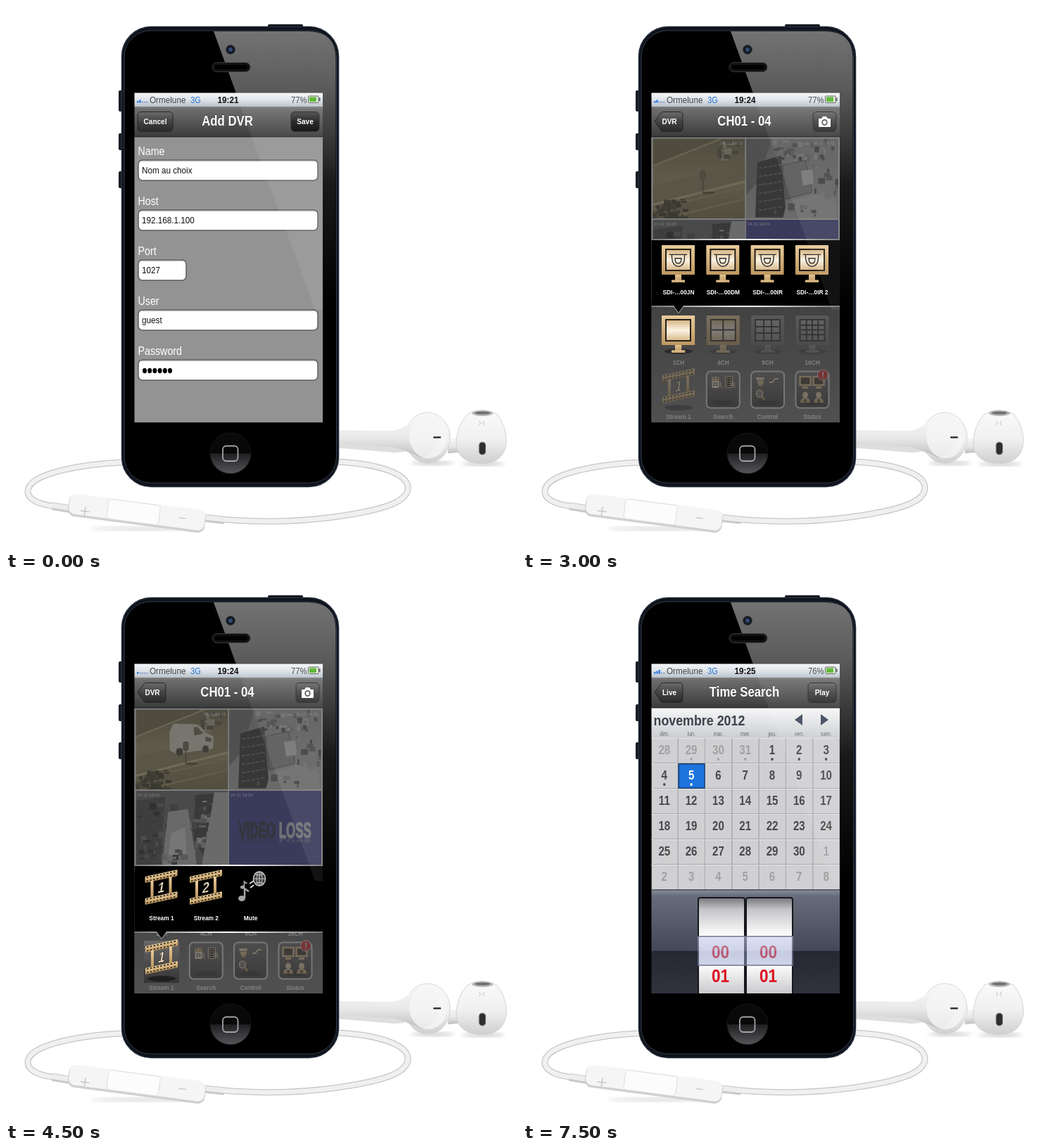
Recreate the animation shown at these times as an HTML page. Size 726x772 px, loop 8 s.

```html
<!DOCTYPE html>
<html lang="fr">
<head>
<meta charset="utf-8">
<title>DVR app tour</title>
<style>
html, body { margin: 0; width: 100%; height: 100%; overflow: hidden; background: #fff; }
svg { display: block; font-family: "Liberation Sans", Arial, sans-serif; }
.scene { visibility: hidden; animation: show 8s step-end infinite; }
.scene.last { animation-name: showLast; }
@keyframes show { 0% { visibility: visible; } 18.75%, 100% { visibility: hidden; } }
@keyframes showLast { 0% { visibility: visible; } 6.25%, 100% { visibility: hidden; } }
</style>
</head>
<body>
<svg id="stage" width="100%" height="100%" viewBox="0 0 726 772"></svg>
<script>
const CARRIER = 'Ormelune';
const defs = [];

const gradient = (id, stops, horizontal = false) => {
  defs.push(`<linearGradient id="${id}" x1="0" y1="0" x2="${+horizontal}" y2="${+!horizontal}">` +
    stops.map(([at, color, alpha = 1]) => `<stop offset="${at}" stop-color="${color}" stop-opacity="${alpha}"/>`).join('') +
    '</linearGradient>');
  return `url(#${id})`;
};
const rect = (x, y, w, h, fill, r = 0, more = '') =>
  `<rect x="${x}" y="${y}" width="${w}" height="${h}" rx="${r}" fill="${fill}" ${more}/>`;
const oval = (x, y, rx, ry, fill, more = '') =>
  `<ellipse cx="${x}" cy="${y}" rx="${rx}" ry="${ry}" fill="${fill}" ${more}/>`;
const shape = (d, fill, more = '') => `<path d="${d}" fill="${fill}" ${more}/>`;
const line = (d, color, width, more = '') =>
  `<path d="${d}" fill="none" stroke="${color}" stroke-width="${width}" ${more}/>`;
const at = (x, y, scale, body) => `<g transform="translate(${x} ${y}) scale(${scale})">${body}</g>`;
const repeat = (n, draw) => Array.from({ length: n }, (_, i) => draw(i)).join('');

// The handset shows a 320 x 480 interface on a 268 x 469 screen.
const text = (x, y, label, size, fill = '#fff', { anchor = 'middle', weight = 700, more = '' } = {}) =>
  `<text transform="translate(${x} ${y}) scale(.8375 .977)" dy=".36em" font-size="${size}" font-weight="${weight}" ` +
  `text-anchor="${anchor}" fill="${fill}" ${more}>${label}</text>`;

const randomizer = seed => () => (seed = (seed * 16807) % 2147483647) / 2147483647;

const paint = {
  status: gradient('status', [[0, '#f6f8fa'], [.5, '#dfe4e9'], [1, '#b9c2cb']]),
  nav: gradient('nav', [[0, '#808080'], [.08, '#6d6d6d'], [1, '#3b3b3b']]),
  button: gradient('button', [[0, '#6c6c6c'], [.5, '#424242'], [1, '#2a2a2a']]),
  black: gradient('black', [[0, '#4a4a4a'], [.5, '#1b1b1b'], [1, '#050505']]),
  menu: gradient('menu', [[0, '#484646'], [.45, '#5b5959'], [1, '#747272']]),
  tan: gradient('tan', [[0, '#e8cb9b'], [1, '#bd975f']]),
  steel: gradient('steel', [[0, '#8a8a8a'], [1, '#626262']]),
  glass: gradient('glass', [[0, '#d9b785'], [.5, '#fbf3e4'], [1, '#d9bb8c']]),
  dull: gradient('dull', [[0, '#a9a9a9'], [1, '#7b7b7b']]),
  tile: gradient('tile', [[0, '#6a6868'], [.6, '#4a4848'], [1, '#353333']]),
  rule: gradient('rule', [[0, '#777'], [.5, '#fff'], [1, '#777']], true)
};

/* ---------- bars ---------- */
const statusBar = (clock, level, bars) =>
  rect(182, 123, 269, 20, paint.status) +
  repeat(5, i => {
    const h = i < bars ? 2.5 + i * 1.4 : 1.6;
    return rect(186 + i * 3.3, 137.5 - h, 2.5, h, i < bars ? '#2f7de0' : '#7f9cc4');
  }) +
  text(204, 133, CARRIER, 14, '#3f4347', { anchor: 'start', weight: 400 }) +
  text(269.5, 133, '3G', 13, '#2272d8', { weight: 400 }) +
  text(315.5, 133, clock, 14, '#111') +
  text(427.5, 133, level + '%', 13.5, '#3f4347', { anchor: 'end', weight: 400 }) +
  rect(429.5, 128, 14.5, 9.5, '#e8f4e0', 1, 'stroke="#555"') +
  rect(431, 129.5, 10, 6.5, '#55b52c') + rect(444.5, 130.5, 2, 4.5, '#555');

const button = (x, w, label, fill = paint.button) =>
  rect(x, 150.5, w, 28, fill, 5, 'stroke="#252525"') + text(x + w / 2, 164, label, 12);
const backButton = label =>
  shape('M187 164 L196 152 Q197 150.500 200 150.500 H222 Q227 150.500 227 155 V174 Q227 178.500 222 178.500 H200 Q197 178.500 196 177 Z',
    paint.button, 'stroke="#252525"') + text(208, 164, label, 12);
const cameraButton =
  rect(412, 150.500, 33, 28, paint.button, 5, 'stroke="#2a2a2a"') +
  shape('M420 160 h4 l2 -3 h5 l2 3 h4 v12 h-17 z', '#fff') +
  oval(428.500, 165.500, 4.200, 4.500, '#555') + oval(428.500, 165.500, 2.400, 2.700, '#fff');
const navBar = (title, controls) =>
  rect(182, 143, 269, 43, paint.nav) + rect(182, 185, 269, 1.5, '#2a2a2a') +
  text(314.5, 163, title, 20, '#fff', { more: 'style="text-shadow:0 -1px #333"' }) + controls;

/* ---------- form ---------- */
const field = (y, label, value, w = 255) =>
  text(187.5, y - 12.5, label, 17, '#fff', { anchor: 'start', weight: 400 }) +
  rect(188, y, w, 29, '#fff', 6, 'stroke="#5d5d5d" stroke-width="1.5"') +
  line(`M192 ${y + 1.5} h${w - 8}`, '#bbb', 1) +
  (value ? text(193, y + 14, value, 14, '#111', { anchor: 'start', weight: 400 })
    : repeat(6, i => oval(197 + i * 7.2, y + 15.5, 3, 3.7, '#000')));

const form = rect(182, 186, 269, 407, '#939393') +
  field(219, 'Name', 'Nom au choix') + field(290, 'Host', '192.168.1.100') +
  field(361, 'Port', '1027', 68) + field(432, 'User', 'guest') + field(503, 'Password');

/* ---------- cameras ---------- */
const stamp = x => `<text x="${x}" y="8" font-size="6" fill="#fff">24-11 19:23</text>`;
const view = (x, y, body) => `<svg x="${x}" y="${y}" width="131" height="113.500">${body}</svg>`;
const clutter = (seed, n, x, y, w, h, tone = v => `rgb(${v},${v},${v})`) => {
  const rnd = randomizer(seed);
  return repeat(n, () => {
    const [px, py, pw, ph] = [x + rnd() * w, y + rnd() * h, 2 + rnd() * 9, 2 + rnd() * 8];
    return rect(px.toFixed(1), py.toFixed(1), pw.toFixed(1), ph.toFixed(1), tone(Math.round(25 + rnd() * 190)));
  });
};
gradient('street', [[0, '#6c6541'], [.5, '#9d905f'], [1, '#766c42']]);
gradient('wall', [[0, '#8f8f8f'], [1, '#b0b0b0']]);

const van = (x, y) => at(x, y, 1,
  shape('M0 12 L4 2 Q5 0 9 0 L38 1 Q45 3 50 12 L62 18 V34 Q58 38 52 37 L10 43 L0 38 Z', '#e4dfc8') +
  shape('M34 5 H40 L48 14 L35 17 Z M51 18 l8 3 v5 l-8 -1 z', '#696347') +
  oval(14, 40, 5, 5.5, '#39351f') + oval(51, 36, 4.5, 5, '#39351f'));

const street = vanAt => view(184.5, 188.5,
  rect(0, 0, 131, 114, 'url(#street)') + shape('M0 0 H92 L0 37 Z', '#6d653d') +
  line('M0 39 L98 0', '#b9ab76', 2) + shape('M0 68 L131 34 V58 L0 91 Z', '#8b7f54') +
  line('M0 94 L131 61', '#cdbd83', 3) + line('M0 101 L131 69 M30 110 L131 86', '#a5975f', 2) +
  clutter(19, 14, 92, 4, 30, 20, v => v > 120 ? '#b4ad8a' : '#514d35') +
  (vanAt ? van(...vanAt) : '') +
  line('M71 58 V76', '#4b4529', 1.5) + rect(67.5, 46, 7, 12, '#6d6546', 2, 'stroke="#4b4529"') +
  oval(79, 77, 9, 1.8, '#4f482b') +
  clutter(7, 42, -3, 82, 47, 32, v => v > 110 ? '#403b20' : '#2c2916') + stamp(96));

const office = view(317, 188.5,
  rect(0, 0, 131, 114, 'url(#wall)') + shape('M0 0 H36 L18 60 L0 80 Z', '#717171') +
  shape('M16 34 L50 24 L57 112 H13 Z', '#292929') +
  repeat(6, i => line(`M18 ${42 + i * 12} l33 -5`, '#777', 1.5, 'stroke-dasharray="5 2"')) +
  clutter(31, 38, 38, 0, 88, 28) + shape('M52 38 L84 31 L94 76 L57 86 Z', '#888', 'stroke="#3d3d3d"') +
  shape('M78 46 L94 44 L96 64 L81 67 Z', '#ddd') + clutter(43, 20, 94, 26, 34, 68) +
  shape('M58 90 L100 78 L128 92 V114 H52 Z', '#bcbcbc') + clutter(12, 10, 40, 90, 60, 20) + stamp(94));

const shop = view(184.5, 304,
  rect(0, 0, 131, 114, '#5f5f5f') + shape('M0 14 L42 8 L34 114 H0 Z', '#3c3c3c') +
  clutter(55, 50, 2, 14, 48, 88, v => `rgb(${v >> 1},${v >> 1},${v >> 1})`) +
  shape('M46 30 L74 26 L88 114 H36 Z', '#b8b8b8') + shape('M50 60 L70 52 L72 90 L46 92 Z', '#e0e0e0') +
  shape('M84 6 L110 4 L100 100 L82 68 Z', '#2d2d2d') + clutter(81, 34, 78, 6, 30, 70) +
  shape('M112 2 H131 V114 H92 Z', '#bdbdbd') + clutter(29, 18, 30, 80, 64, 30) + stamp(2));

const lossText = (y, sy, alpha) => `<g transform="translate(382 ${y}) scale(.555 ${sy})" opacity="${alpha}">` +
  `<text text-anchor="middle" font-size="30.500" font-weight="700" stroke-width="1.4" fill="#202033" stroke="#202033">` +
  `VIDEO <tspan fill="#d2d2da" stroke="#d2d2da">LOSS</tspan></text></g>`;
const lost = view(317, 304, rect(0, 0, 131, 114, '#2f2f90') + stamp(2)) +
  lossText(371, 1, 1) + lossText(373, -.2, .4);

const cameras = vanAt => rect(182, 186.5, 269, 232, '#f4f4f4') + street(vanAt) + office + shop + lost;

/* ---------- icons ---------- */
const columns = [221, 284.3, 347.6, 411];
const domeSketch = line('M-14 -3 H14 M-10 -3 V2 Q-9 15 0 16 Q10 15 10 2 V-3 M-5 3 Q-5 11 0 11 Q5 11 5 3 Z', '#2a2a2a', 1.5);

const monitor = (x, y, { split = 1, lit = true, dome = false } = {}) => {
  const frame = lit ? paint.tan : paint.steel;
  const step = [33 / split, 27 / split];
  return at(x, y, 1,
    oval(0, 51, 20, 4, '#000', 'opacity=".3"') +
    rect(-4.5, 41, 9, 10, frame) + rect(-9.5, 49.5, 19, 3.5, frame) +
    rect(-23.5, 0, 47, 42, frame, 1) + rect(-18.5, 5, 37, 32, '#241f18') +
    rect(-16.5, 7, 33, 28, lit ? paint.glass : paint.dull) +
    repeat(split - 1, i => line(`M${-16.5 + step[0] * (i + 1)} 7 v28 M-16.500 ${7 + step[1] * (i + 1)} h33`, '#241f18', 2)) +
    (dome ? at(0, 16, .9, domeSketch) : ''));
};

const film = (x, y, digit) => {
  const strip = dy => rect(-23, dy, 46, 9, paint.tan, 1) +
    line(`M-21 ${dy + 2} h43 M-21 ${dy + 7} h43`, '#2b2419', 1.8, 'stroke-dasharray="2.500 2.300"');
  return `<g transform="translate(${x} ${y}) skewY(-12)">` + strip(-20) + strip(11) +
    rect(-15, -12, 4, 24, paint.tan) + rect(11, -12, 4, 24, paint.tan) +
    text(0, 0, digit, 21, '#f8ecd3', { more: 'stroke="#2b2419" stroke-width=".6" font-style="italic"' }) + '</g>';
};

const lens = (x, y) => line(`M${x + 5} ${y + 6} l7 9`, '#c69c63', 4) +
  oval(x, y, 7.500, 8.500, '#fff', `fill-opacity=".25" stroke="#e3c89c" stroke-width="2.500"`);
const calendarIcon = rect(-18, -21, 27, 43, '#f5ead6', 2) + rect(-18, -21, 27, 16, paint.tan, 2) +
  oval(-11, -17, 2.500, 4, '#3a2d1b') + oval(3, -17, 2.500, 4, '#3a2d1b') +
  text(-4.5, 8, '21', 20, '#1c160d') + lens(11, 7);
const listIcon = rect(-18, -22, 28, 42, '#15120d', 2, 'stroke="#ead4ae" stroke-width="3"') +
  repeat(4, i => rect(-14, -17 + i * 9, 5, 5, '#ead4ae') + rect(-6, -16 + i * 9, 13, 3, '#ead4ae')) + lens(11, 7);
const person = oval(0, -3, 4, 4.500, '#e6cfaa') + shape('M-7 8 Q-7 1 0 1 Q7 1 7 8 Z', paint.tan) + oval(0, 5, 2, 2.500, '#493b28');
const miniMonitor = rect(-7.5, -8, 15, 12, '#3a2f20', 0, 'stroke="#dfc08e" stroke-width="2.500"') + rect(-4, 6, 8, 3, '#dfc08e');

const tile = (x, body) => rect(x - 23.5, 519.5, 47, 52, paint.tile, 6, 'stroke="#e4e4e4" stroke-width="2"') +
  oval(x, 564, 16, 4, '#000', 'opacity=".3"') + body;
const searchTile = tile(columns[1], at(275, 535, .36, calendarIcon) + at(294, 535, .36, listIcon));
const controlTile = tile(columns[2],
  shape('M331 528 h12 l-1 4 h-10 z', '#ead4ae') + shape('M333 533 h9 q-1 8 -4.500 8 t-4.500 -8 z', paint.tan) +
  line('M350 535 h4 l4 -5 h5', '#ead4ae', 2) + at(336, 551, .6, lens(0, 0)));
const statusTile = tile(columns[3],
  at(401, 535, 1, miniMonitor) + at(420, 535, 1, miniMonitor) + at(401, 556, 1, person) + at(420, 556, 1, person) +
  oval(426, 524.5, 7.5, 7.5, '#d81f22', 'stroke="#fff" stroke-width=".8"') + text(426, 524.5, '!', 13));
const streamIcon = oval(221, 571, 20, 4, '#000', 'opacity=".45"') + film(221, 540, 1);

const captions = (labels, y) => labels.map((label, i) => text(columns[i], y, label, 10)).join('');
const menu = rect(182, 418.5, 269, 175, paint.menu) +
  [1, 2, 3, 4].map((split, i) => monitor(columns[i], 440, { split, lit: i < 2 })).join('') +
  captions(['1CH', '4CH', '9CH', '16CH'], 506) +
  streamIcon + searchTile + controlTile + statusTile +
  captions(['Stream 1', 'Search', 'Control', 'Status'], 583.5);

const dim = rect(182, 186.5, 269, 407, '#404040', 0, 'opacity=".66"');
const drawer = (y, notch, body) => rect(182, y, 269, 95, '#000') +
  rect(182, y - 1, 269, 2, paint.rule) + rect(182, y + 94, 269, 2, paint.rule) +
  shape(`M${notch - 7} ${y + 94} L${notch} ${y + 104} L${notch + 7} ${y + 94} Z`, '#050505') +
  line(`M${notch - 7} ${y + 95} l7 9.500 l7 -9.500`, '#aaa', 1) + body;

const channelDrawer = drawer(332, 221,
  columns.map(x => monitor(x - .5, 340, { dome: true })).join('') +
  captions(['SDI-…00JN', 'SDI-…00DM', 'SDI-…00IR', 'SDI-…0IR 2'], 406.5));

const globe = oval(360, 429, 8.500, 10, '#3c3c3c', 'stroke="#c4c4c4" stroke-width="1.500"') +
  line('M351.500 429 h17 M360 419 v20 M354 422 q6 4 12 0 M354 436 q6 -4 12 0', '#c4c4c4', 1.2) +
  oval(360, 429, 4, 10, 'none', 'stroke="#c4c4c4"') +
  oval(335, 457, 5, 4, '#a5a5a5') + line('M339 456 V443 l6 4', '#a5a5a5', 2.5) +
  oval(336, 441, 3, 2.500, '#a5a5a5') + line('M338.500 441 v-8 l4 3', '#a5a5a5', 1.8) +
  line('M346 436 l6 -4 M347 442 l5 -4', '#ddd', 2);
const streamDrawer = drawer(410, 221,
  film(220.5, 441, 1) + film(284, 441, 2) + globe + captions(['Stream 1', 'Stream 2', 'Mute'], 484.5));
const searchDrawer = drawer(410, 284.5,
  at(221, 442, 1, calendarIcon) + at(284, 442, 1, listIcon) + captions(['Time Search', 'Log Search'], 484.5));

/* ---------- time search ---------- */
gradient('month', [[0, '#f7f7f8'], [1, '#cbcdd1']]);
gradient('backdrop', [[0, '#8b909c'], [.06, '#666c7b'], [.58, '#434958'], [.59, '#252832'], [1, '#31343f']]);
gradient('wheel', [[0, '#77777c'], [.12, '#c5c5c9'], [.38, '#fdfdfd'], [.7, '#fafafa'], [1, '#c4c4c8']]);
gradient('band', [[0, '#c9cfea', .6], [.5, '#a9b2da', .55], [.51, '#8f9ac8', .5], [1, '#a4add3', .5]]);

const dayWidth = 38.3;
const day = i => {
  const x = 182.3 + (i % 7) * dayWidth, y = 229 + Math.floor(i / 7) * 36;
  const number = i < 4 ? 28 + i : (i - 4) % 30 + 1;
  const picked = i === 8, other = i < 4 || i > 33;
  const ink = picked ? '#fff' : other ? '#a1a1a3' : '#48484a';
  return rect(x, y, dayWidth, 36, picked ? '#1c74dc' : '#d0d0d2') +
    line(`M${x} ${y + .5} h${dayWidth}`, '#e6e6e8', 1) +
    line(`M${x + dayWidth - .5} ${y} v35.500 h${-dayWidth}`, '#a5a8ae', 1) +
    (picked ? rect(x + .7, y + .7, dayWidth - 1.4, 34.5, 'none', 0, 'stroke="#193d70" stroke-width="1.500"') : '') +
    text(x + 18.5, y + 17, number, 18, ink) +
    (i > 0 && i < 9 ? oval(x + 18.5, y + 30, 1.7, 1.9, ink) : '');
};
const wheel = x => rect(x, 456, 66, 140, 'url(#wheel)', 3, 'stroke="#17181d" stroke-width="2"') +
  ['00', '01', '02'].map((value, i) => text(x + 31.5, 532 + i * 34.5, value, 27, '#dc1420')).join('');
const calendar = rect(182, 186, 269, 43, 'url(#month)') +
  text(185.5, 204, 'novembre 2012', 21.3, '#3d434b', { anchor: 'start' }) +
  shape('M386 203 l11 -8 v16 z M434 203 l-11 -8 v16 z', '#3f4a5a') +
  ['dim.', 'lun.', 'mar.', 'mer.', 'jeu.', 'ven.', 'sam.'].map((name, i) =>
    text(201 + i * dayWidth, 222.5, name, 8.5, '#65686c', { weight: 400 })).join('') +
  repeat(42, day) +
  rect(182, 444.5, 269, 149, 'url(#backdrop)') + rect(182, 444, 269, 1.5, '#4c505a') +
  wheel(249) + wheel(317) +
  rect(248, 511, 136, 41, 'url(#band)') + line('M248 511 h136 M248 552 h136', '#6d7491', 1.5);

/* ---------- scenes ---------- */
const liveNav = navBar('CH01 - 04', backButton('DVR') + cameraButton);
const live = (clock, bars, vanAt, overlay = '') =>
  cameras(vanAt) + menu + overlay + statusBar(clock, 77, bars) + liveNav;
const highlight = x => rect(x - 25, 517, 50, 60, paint.tile);

const scenes = [
  form + statusBar('19:21', 77, 2) + navBar('Add DVR', button(187, 50, 'Cancel') + button(405, 40, 'Save', paint.black)),
  `<g transform="translate(.7 .7)">${live('19:23', 2, [-15, 49])}</g>`,
  live('19:24', 2, null, dim + channelDrawer + monitor(columns[0] - .5, 440)),
  live('19:24', 1, [48, 20], dim + highlight(columns[0]) + streamIcon + streamDrawer),
  live('19:24', 2, null, dim + highlight(columns[1]) + searchTile + searchDrawer),
  calendar + statusBar('19:25', 76, 3) + navBar('Time Search', backButton('Live') + button(405, 40, 'Play'))
].map((body, i, all) =>
  `<g class="scene${i === all.length - 1 ? ' last' : ''}" style="animation-delay:${i ? i * 1.5 - 8 : 0}s">${body}</g>`).join('');

/* ---------- handset and earphones ---------- */
gradient('bud', [[0, '#fafafa'], [.55, '#f0f0f0'], [1, '#cfcfcf']]);
gradient('stem', [[0, '#f8f8f8'], [.55, '#e9e9e9'], [1, '#bdbdbd']]);
gradient('glare', [[0, '#fff', .45], [.2, '#fff', .36], [.55, '#fff', .1], [1, '#fff', 0]]);
gradient('home', [[0, '#0a0a0a'], [.5, '#070707'], [.51, '#202022'], [1, '#56565a']]);
defs.push('<clipPath id="screen"><rect x="182.500" y="123.500" width="267.500" height="468.500"/></clipPath>' +
  '<filter id="soft"><feGaussianBlur stdDeviation="3"/></filter>');

const cablePath = 'M172 648.500 C110 651 31 664 31 690 C31 707 62 711 92 715 M278 727 C330 733 400 736 470 726 C540 716 572 704 571 684 C570 664 525 650 468 648';
const earphones =
  oval(606, 650, 30, 3, '#ccc', 'filter="url(#soft)"') + oval(678, 651, 30, 3, '#ccc', 'filter="url(#soft)"') +
  oval(200, 743, 80, 3, '#ddd', 'filter="url(#soft)"') +
  line(cablePath, '#c6c6c6', 9) + line(cablePath, '#f0f0f0', 6.5) +
  line('M66 711 l24 4 M282 728 l28 3', '#c9c9c9', 11) + line('M66 710 l24 4 M282 727 l28 3', '#ededed', 7) +
  shape('M468 621 L560 626 L566 634 L552 635 L468 628 Z', '#dedede') +
  shape('M628 616 L648 613 V634 L628 636 Z', 'url(#stem)') +
  oval(599, 614, 32, 36, 'url(#bud)', 'stroke="#d6d6d6"') +
  shape('M468 603 L548 604 Q566 602 580 586 Q594 575 606 582 Q616 600 614 620 Q606 640 590 642 Q572 634 550 627 L468 622 Z', 'url(#stem)') +
  oval(600, 612, 27, 31, '#f7f7f7', 'opacity=".8"') + rect(607, 612, 11, 2.5, '#333', 1) +
  shape('M656 580 Q676 569 697 580 Q711 596 711 620 Q708 650 677 650.500 Q643 650 639.500 624 Q640 596 656 580 Z', 'url(#bud)', 'stroke="#d3d3d3"') +
  oval(677, 579, 15, 4, '#b7b7b7') + oval(677, 578.5, 11, 2, '#6e6e6e') +
  rect(672, 620, 9.5, 18, '#2e2e2e', 4.5, 'stroke="#999"') +
  line('M672 590 q4 3 0 6 M680 590 q-4 3 0 6', '#bbb', 1) +
  `<g transform="translate(186 721) rotate(7.500)">` +
  rect(-98, -15.5, 196, 32, '#d0d0d0', 10) + rect(-97, -16, 194, 29, '#f5f5f5', 9) +
  rect(-42, -15, 74, 28, '#fcfcfc', 4, 'stroke="#dedede"') +
  line('M-80 7 h13 M-73.500 0.500 v13 M60 -1.500 h10', '#c4c4c4', 1.3) + '</g>';

const handset =
  rect(372, 26, 50, 8, '#15191f', 2) +
  [[120, 30], [181, 24], [235, 24]].map(([y, h]) => rect(160, y, 8, h, '#171c25', 2)).join('') +
  rect(164.5, 29.5, 308, 654, '#0e131c', 42, 'stroke="#252d3b" stroke-width="1.500"') +
  rect(168, 35, 301.5, 643, '#000', 37, 'stroke="#343c4a"') +
  shape('M295 36 H430 Q468.500 37 468.500 75 V432 H439 Z', 'url(#glare)') +
  oval(319, 62, 6.5, 6.5, '#15181e', 'stroke="#3a3f48"') + oval(319, 62, 3, 3, '#304a74') +
  rect(293, 80.5, 54, 13, '#111', 6.5, 'stroke="#3b3b3b"') + rect(297, 84, 46, 6, '#000', 3) +
  oval(319, 636, 29, 29, 'url(#home)', 'stroke="#161616"') +
  rect(308, 625.5, 21.5, 21.5, 'none', 5, 'stroke="#a4a4a6" stroke-width="1.800"');

const screen = `<g clip-path="url(#screen)">${rect(182, 123, 269, 470, '#000')}${scenes}` +
  shape('M326 123 H451 V432 H439 Z', '#fff', 'opacity=".07"') + '</g>';

document.getElementById('stage').innerHTML = `<defs>${defs.join('')}</defs>` + earphones + handset + screen;
</script>
</body>
</html>
```
